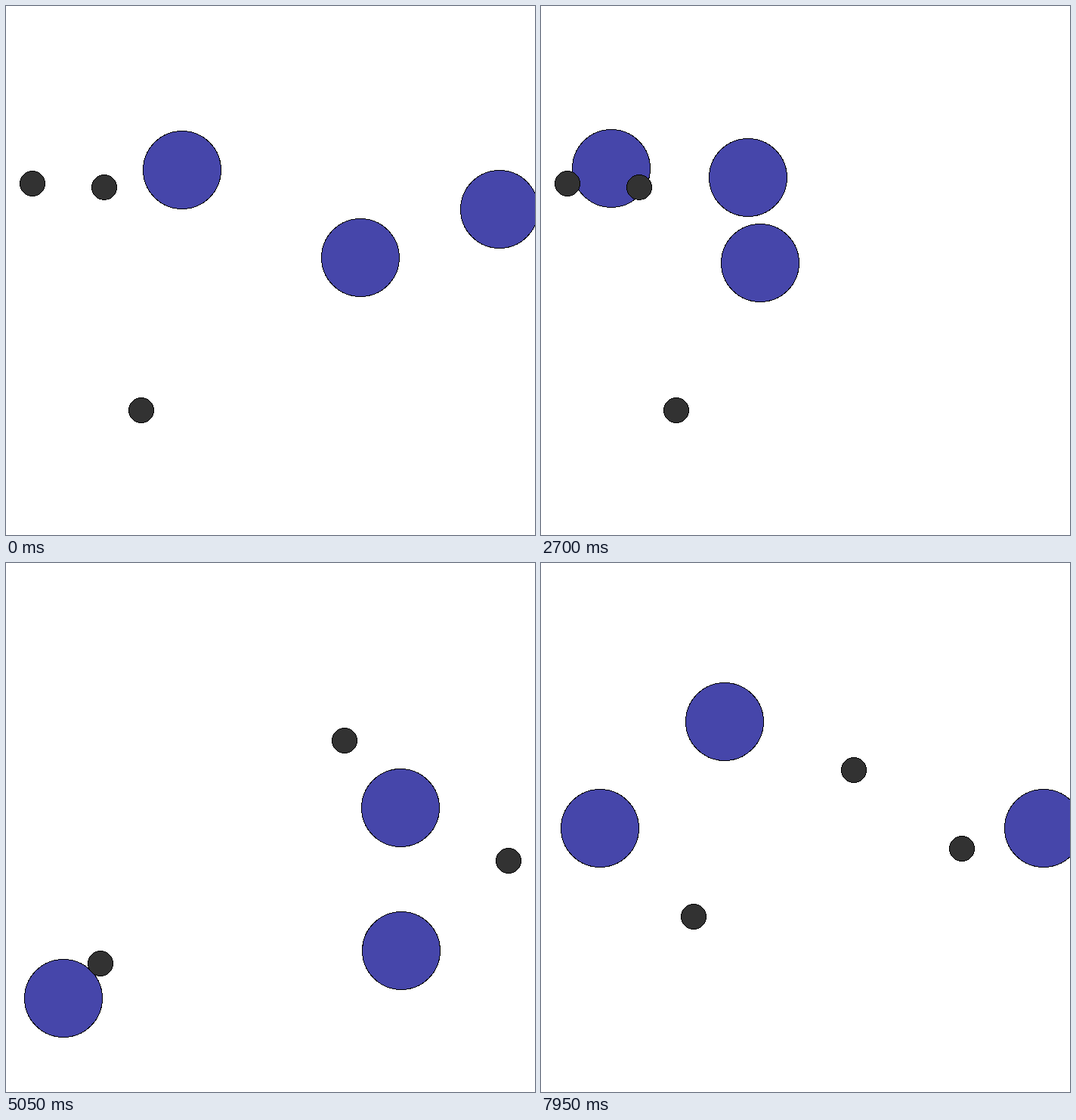
Recreate the animation shown at these times as an HTML page. Size 700 by 700 pixels, loop 8000 ms.

```html
<!DOCTYPE html>
<html lang="en">
<head>
<meta charset="utf-8">
<title>Three agents, three landmarks</title>
<style>
  html, body { margin: 0; width: 100%; height: 100%; overflow: hidden; background: #fff; }
  svg { display: block; width: 100vw; height: 100vh; }
  circle { stroke: #000; stroke-width: 1; shape-rendering: crispEdges; }
  .agent { fill: #4646aa; }
  .landmark { fill: #323232; }
</style>
</head>
<body>
<svg id="stage" viewBox="0 0 700 700"></svg>
<script>
const STEP = 50, STEPS = 160, CENTER = 350, REACH = 315;

// Positions are relative to the centre; every path passes its points at the shared times.
const episodes = [
  {
    times: [0, 17, 33, 54, 83],
    landmarks: [[-315, -115], [-220, -110], [-171, 185]],
    paths: [
      [[-117, -133], [-115, -215], [-106, -230], [-257, -135], [-290, -8]],
      [[119, -17], [94, 98], [18, 27], [-60, -10], [-162, 30]],
      [[303, -81], [94, -110], [-86, -133], [-76, -123], [-166, -72]]
    ]
  },
  {
    times: [94, 117, 140, 159],
    landmarks: [[98.5, -114.1], [315, 44], [-224.8, 180]],
    paths: [
      [[-100, 202], [-571, 269], [-529, 113], [-413, 2]],
      [[130, -10], [244, -64], [13, -175], [-162, -212]],
      [[150, 170], [233, 144], [414, 53], [479, 2]]
    ]
  }
];

const stage = document.getElementById("stage");

function makeCircles(className, radius) {
  return [0, 1, 2].map(() => {
    const circle = document.createElementNS("http://www.w3.org/2000/svg", "circle");
    circle.setAttribute("class", className);
    circle.setAttribute("r", radius - 0.5);
    return stage.appendChild(circle);
  });
}

const circles = [...makeCircles("agent", 52), ...makeCircles("landmark", 17)];

// Smooth curve without overshoot, held after the last point.
function interpolate(times, values, step) {
  const last = times.length - 1;
  if (step >= times[last]) return values[last];
  const chord = k => (values[k + 1] - values[k]) / (times[k + 1] - times[k]);
  const slope = k => {
    const before = chord(Math.max(k - 1, 0)), after = chord(Math.min(k, last - 1));
    return before * after > 0 ? 2 * before * after / (before + after) : 0;
  };
  const i = times.findIndex(time => time > step) - 1;
  const span = times[i + 1] - times[i], u = (step - times[i]) / span;
  return values[i] + (values[i + 1] - values[i]) * u * u * (3 - 2 * u) +
    span * u * (1 - u) * (slope(i) * (1 - u) - slope(i + 1) * u);
}

function draw(now) {
  const step = Math.floor(now / STEP) % STEPS;
  const { times, paths, landmarks } = episodes.findLast(e => step >= e.times[0]);
  const agents = paths.map(path =>
    [0, 1].map(axis => interpolate(times, path.map(point => point[axis]), step)));
  const points = [...agents, ...landmarks];

  // The camera keeps the farthest object at a fixed distance from the centre.
  const zoom = REACH / Math.max(...points.flat().map(Math.abs));
  const toPixel = v => Math.floor(CENTER + v * zoom + 1e-6);
  points.forEach(([x, y], i) => {
    circles[i].setAttribute("cx", toPixel(x));
    circles[i].setAttribute("cy", toPixel(y));
  });
}

const startTime = performance.now();
function tick() {
  draw(performance.now() - startTime);
  requestAnimationFrame(tick);
}
tick();
</script>
</body>
</html>
```
